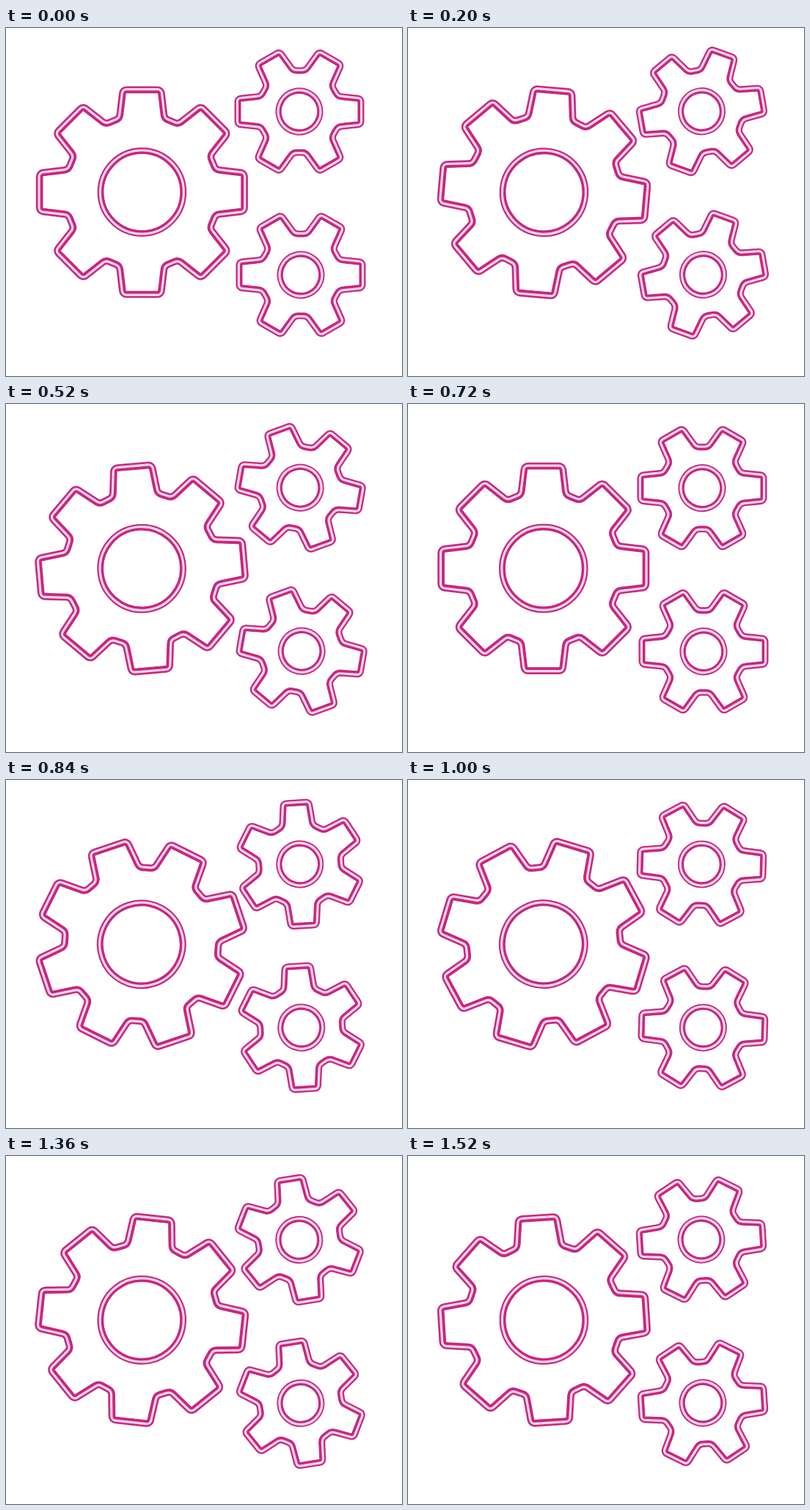
An HTML page with a canvas for the animation above (1560 ms loop, 540 px wide and 475 px high).

```html
<!DOCTYPE html>
<html lang="en">
<head>
<meta charset="utf-8">
<title>Gears</title>
<style>
html, body { margin: 0; width: 100%; height: 100%; overflow: hidden; background: #fff; }
canvas { display: block; }
</style>
</head>
<body>
<canvas id="stage" width="540" height="475"></canvas>
<script>
const ctx = document.getElementById('stage').getContext('2d');
const LOOP = 1560, STEP = 40, HALF = 18;
const EDGE = '#bf5793', BODY = '#c9267d', SHINE = '#fbd6ec';

// Outline of straight-sided teeth with rounded corners, plus the hub ring.
function gearPath({ teeth, tipR, tipW, rootR, rootW, tipRound, rootRound, hub }) {
  const profile = [[-rootW, -rootR, rootRound], [-tipW, -tipR, tipRound],
                   [tipW, -tipR, tipRound], [rootW, -rootR, rootRound]];
  const pts = [];
  for (let i = 0; i < teeth; i++) {
    const a = i * 2 * Math.PI / teeth, c = Math.cos(a), s = Math.sin(a);
    for (const [x, y, r] of profile) pts.push([x * c - y * s, x * s + y * c, r]);
  }
  const path = new Path2D();
  path.moveTo(0, -tipR);
  for (let i = 0; i < pts.length; i++) {
    const [x, y, r] = pts[(i + 2) % pts.length];
    const [nx, ny] = pts[(i + 3) % pts.length];
    path.arcTo(x, y, nx, ny, r);
  }
  path.closePath();
  const ring = new Path2D();
  ring.arc(0, 0, hub, 0, 2 * Math.PI);
  return { path, ring };
}

const big = gearPath({ teeth: 8, tipR: 140.3, tipW: 26.5, rootR: 101, rootW: 31.2,
                       tipRound: 6, rootRound: 8, hub: 57 });
const small = gearPath({ teeth: 6, tipR: 84.6, tipW: 18, rootR: 53, rootW: 21.3,
                         tipRound: 5, rootRound: 9, hub: 29 });

// dx, dy: how far the gear sits off its axle; turn: starting angle in degrees.
const gears = [
  { shape: big, x: 185.1, y: 224.2, dx: 0.3, dy: -0.2, turn: 0, line: 8.6, hubLine: 7.8 },
  { shape: small, x: 400.5, y: 114.4, dx: -0.5, dy: -0.4, turn: 30, line: 8, hubLine: 7.2 },
  { shape: small, x: 402.5, y: 337.4, dx: -0.5, dy: -0.4, turn: 30, line: 8, hubLine: 7.2 }
];

function stroke(path, color, width) {
  ctx.strokeStyle = color;
  ctx.lineWidth = width;
  ctx.stroke(path);
}

// A glossy line whose dark body is heavier on the inner side.
function tube(path, width) {
  ctx.save();
  ctx.clip(path);
  stroke(path, EDGE, width + 2.4);
  stroke(path, BODY, width + 1.2);
  ctx.restore();
  stroke(path, EDGE, width);
  stroke(path, BODY, width - 1.2);
  ctx.save();
  ctx.clip(path);
  stroke(path, BODY, width + 1.2);
  ctx.restore();
  stroke(path, SHINE, 3.2);
}

// The second half turn is a little slower than the first.
function angleAt(step) {
  return step <= HALF ? step * 10 : 180 + (step - HALF) * 8.82;
}

function draw(now) {
  const deg = angleAt(Math.floor((now % LOOP) / STEP));
  ctx.clearRect(0, 0, 540, 475);
  ctx.lineJoin = 'round';
  for (const g of gears) {
    ctx.save();
    ctx.translate(g.x, g.y);
    ctx.rotate(deg * Math.PI / 180);
    ctx.translate(g.dx, g.dy);
    ctx.rotate(g.turn * Math.PI / 180);
    tube(g.shape.path, g.line);
    tube(g.shape.ring, g.hubLine);
    ctx.restore();
  }
}

let start;
function tick(now) {
  start ??= now;
  draw(now - start);
  requestAnimationFrame(tick);
}
draw(0);
requestAnimationFrame(tick);
</script>
</body>
</html>
```
